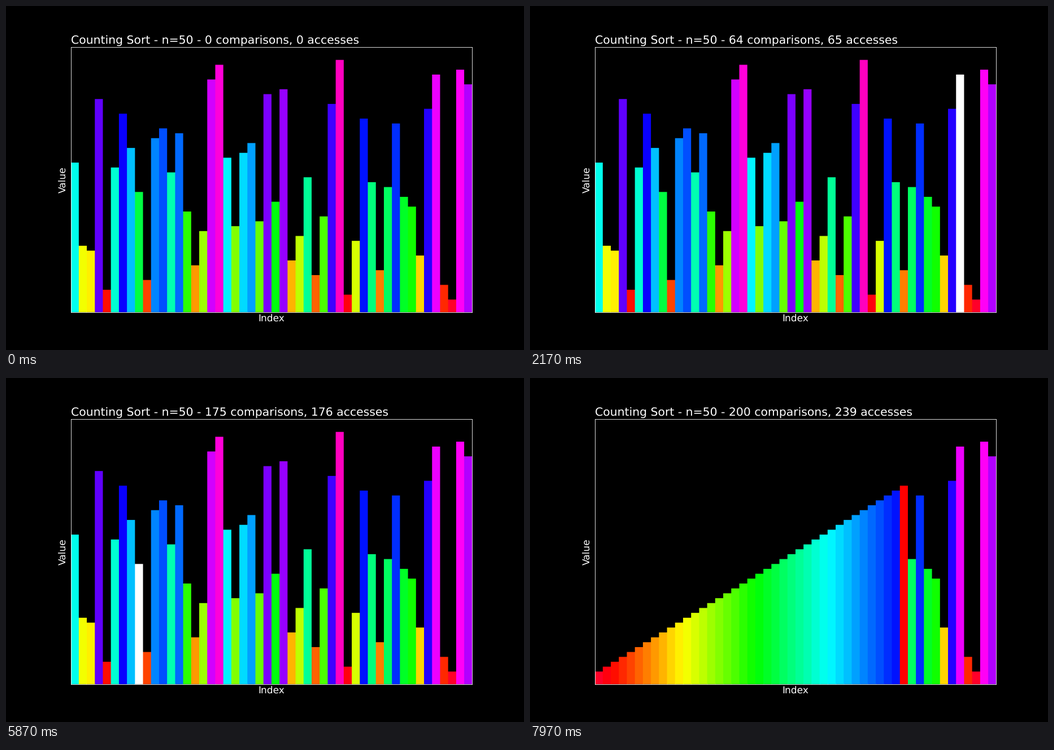
A matplotlib script for the animation above (8 s loop, 917 by 611 pixels).

```python
import numpy as np
import matplotlib.pyplot as plt
from matplotlib.animation import FuncAnimation
from matplotlib.collections import PolyCollection

N = 50
STEPS = 240
LOOP_MS = 8000
TICK_MS = 10  # steps last 30 or 40 ms, so time runs on a 10 ms clock
TICKS = LOOP_MS // TICK_MS
WIDTH, HEIGHT, DPI = 917, 611, 64
K = 76.4 / DPI  # keeps text and lines at 76.4 dpi proportions

READS = 4 * N  # one counting pass, then three reads per element backwards
OVERLAP = 0.08  # hides seams between antialiased neighbours

plt.style.use("dark_background")
plt.rcParams.update({
    "font.family": "DejaVu Sans",
    "font.size": 16 * K,
    "text.hinting": "none",
    "axes.titlepad": 6 * K,
    "axes.labelpad": 4 * K,
    "axes.linewidth": 0.8 * K,
})

values = np.linspace(50, 1000, N)
ordered_colors = plt.get_cmap("gist_rainbow")(np.linspace(0, 1, N))
shuffled = np.random.RandomState(0).permutation(N)
slots = np.arange(N)

fig, ax = plt.subplots(figsize=(WIDTH / DPI, HEIGHT / DPI), dpi=DPI,
                       facecolor="black")
ax.set_facecolor("black")
bars = PolyCollection([], linewidths=0, edgecolors="none", snap=False)
ax.add_collection(bars, autolim=False)
ax.set_xlim(0, N)
ax.set_ylim(0, 1.05 * values[-1])
ax.set_xticks([])
ax.set_yticks([])
ax.set_xlabel("Index")
ax.set_ylabel("Value")
title = ax.set_title("", loc="left")


def active_bar(step):
    """Index and colour of the bar touched at this step."""
    if step == 0:
        return None
    if step <= N:
        return step - 1, (1, 1, 1, 1)
    if step <= READS:
        return N - 1 - (step - N - 1) // 3, (1, 1, 1, 1)
    return step - READS - 1, (1, 0, 0, 1)


def bar_corners(heights):
    """Bars that reach slightly under their taller neighbours."""
    padded = np.pad(heights, 1)
    left = slots - OVERLAP * (padded[:-2] >= heights)
    right = slots + 1 + OVERLAP * (padded[2:] >= heights)
    base = np.zeros(N)
    xs = np.stack([left, left, right, right], axis=1)
    ys = np.stack([base, heights, heights, base], axis=1)
    return np.stack([xs, ys], axis=2)


def draw(tick):
    step = tick * STEPS / TICKS
    step = int(step + 0.1)
    written = max(0, step - READS)
    ranks = np.where(slots < written, slots, shuffled)
    heights = values[ranks]
    colors = ordered_colors[ranks]
    active = active_bar(step)
    if active:
        index, mark = active
        colors[index] = mark

    order = np.argsort(heights, kind="stable")  # tall bars go on top
    bars.set_verts(bar_corners(heights)[order])
    bars.set_facecolor(colors[order])
    comparisons = min(max(step - 1, 0), READS)
    title.set_text(f"Counting Sort - n={N} - {comparisons} comparisons, "
                   f"{step} accesses")
    return [bars, title]


anim = FuncAnimation(fig, draw, frames=TICKS, interval=TICK_MS,
                     init_func=lambda: draw(0), repeat=True, repeat_delay=0,
                     blit=False)
plt.show()
```
